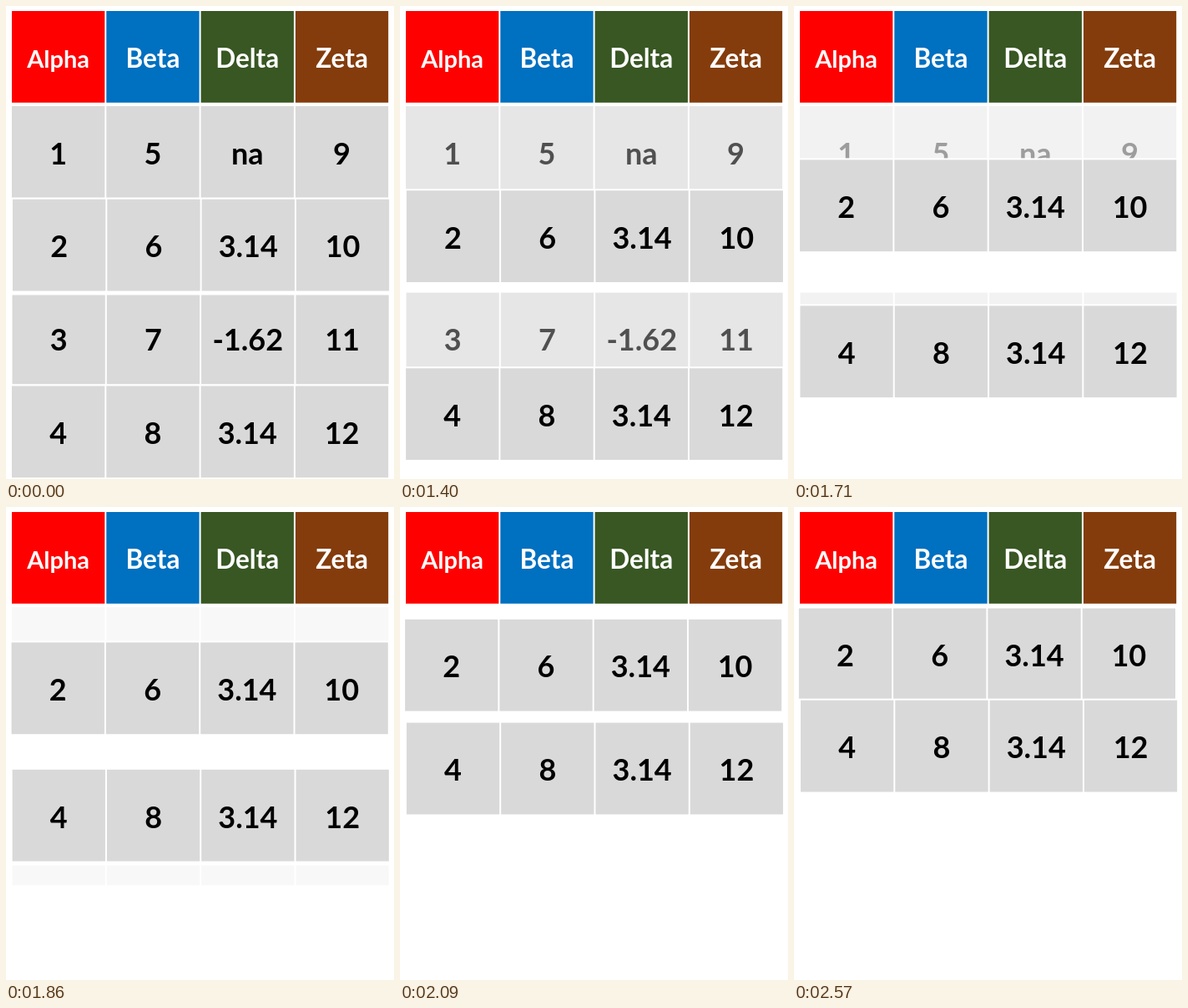
These frames come from a looping animation (465x567 px, 3180 ms). An HTML page with a canvas:

```html
<!DOCTYPE html>
<html lang="en">
<head>
<meta charset="utf-8">
<title>Filtering table rows</title>
<style>
  html, body { margin: 0; height: 100%; overflow: hidden; background: #fff; }
  canvas { display: block; }
</style>
</head>
<body>
<canvas id="stage" width="465" height="567"></canvas>
<script>
const ctx = document.getElementById('stage').getContext('2d');
const LOOP = 3180, START = 1090;
const PITCH = 113.3, CELL_W = 111.3, CELL_H = 109.8;

// Start of each animation step, in hundredths of a second after START
const STEPS = [0, 8, 16, 23, 31, 39, 47, 54, 62, 70, 77, 85, 93, 100, 109, 117, 125, 133, 140, 148];

const HEADERS = [
  ['Alpha', '#ff0000', 29],
  ['Beta', '#0070c0', 31.5],
  ['Delta', '#385723', 31.5],
  ['Zeta', '#843c0c', 31.5]
];

const ROWS = [
  { cells: ['1', '5', 'na', '9'], x: 7, y: 120 },
  { cells: ['3', '7', '-1.62', '11'], x: 7.5, y: 343.6 },
  { cells: ['2', '6', '3.14', '10'], x: 8, y: 231.7, dx: -2.2, dy: -110.2, keep: true },
  { cells: ['4', '8', '3.14', '12'], x: 7, y: 455.5, dx: 1, dy: -223.8, keep: true }
];

const clamp = v => Math.min(1, Math.max(0, v));

function drawCell(text, x, y, fill, ink, size, baseline) {
  ctx.fillStyle = fill;
  ctx.fillRect(x, y, CELL_W, CELL_H);
  ctx.fillStyle = ink;
  ctx.font = `bold ${size}px Lato, Carlito, sans-serif`;
  ctx.fillText(text, x + CELL_W / 2, y + baseline);
}

function drawRow(row, move, fade) {
  const x = row.x + (row.dx || 0) * move;
  const y = row.y + (row.dy || 0) * move;
  ctx.globalAlpha = row.keep ? 1 : fade;
  if (row.keep) {
    // Kept rows carry a white margin that hides the rows beneath
    ctx.fillStyle = '#fff';
    ctx.fillRect(x - 3, y - 2, 4 * PITCH + 4, CELL_H + 7);
  }
  row.cells.forEach((text, i) => drawCell(text, x + i * PITCH, y, '#d9d9d9', '#000', 36, 69.7));
  ctx.globalAlpha = 1;
}

function draw(time) {
  const step = STEPS.filter(s => START + s * 10 <= time).length - 1;
  const move = (1 - Math.cos(Math.PI * clamp((step - 0.88) / 15.65))) / 2;
  const fade = step < 0 ? 1 : clamp(0.95 - 0.075 * step);

  ctx.fillStyle = '#fff';
  ctx.fillRect(0, 0, 465, 567);
  ctx.textAlign = 'center';
  // Removed rows come first, so the kept ones slide over them
  ROWS.forEach(row => drawRow(row, move, fade));
  HEADERS.forEach(([name, color, size], i) =>
    drawCell(name, 7 + i * PITCH, 6, color, '#fff', size, 67.8));
}

function tick() {
  draw(performance.now() % LOOP);
  requestAnimationFrame(tick);
}
tick();
</script>
</body>
</html>
```
